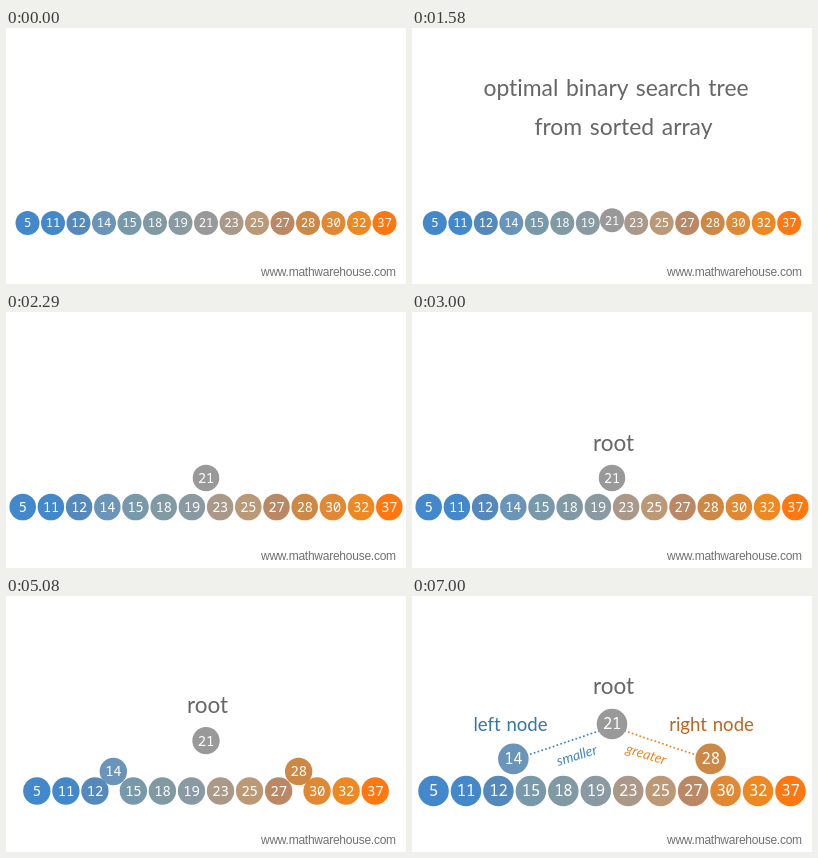
Write an HTML page that moves like this. It is 400 px wide and 256 px high and loops after 8000 ms.

```html
<!DOCTYPE html>
<html lang="en">
<head>
<meta charset="utf-8">
<title>Binary search tree from sorted array</title>
<style>
  html, body { margin: 0; width: 100%; height: 100%; overflow: hidden; background: #fff; }
  svg { display: block; width: 400px; height: 256px; }
  text { font-family: Lato, "Open Sans", sans-serif; font-variant-ligatures: none; text-anchor: middle; }
  .title { font-size: 22.9px; word-spacing: 1.8px; fill: #666; }
  .root { font-size: 22.5px; fill: #666; }
  .label { font-size: 18.6px; word-spacing: 1px; }
  .hint { font-size: 14px; font-style: italic; }
  .ball text { font: 12.3px "Noto Sans Mono", monospace; letter-spacing: -.2px; fill: #fff; }
  .site { font: 12px "Liberation Sans", Arial, sans-serif; letter-spacing: -.25px; text-anchor: start; fill: #707070; }
  .link { stroke-width: 2; stroke-linecap: round; stroke-dasharray: 0 4; }
</style>
</head>
<body>
<svg viewBox="0 0 400 256">
  <g id="title" class="title">
    <text x="204" y="68">optimal binary search tree</text>
    <text x="211.5" y="107">from sorted array</text>
  </g>
  <line id="linkL" class="link" x1="187" y1="135" stroke="#48b"/>
  <line id="linkR" class="link" x1="213" y1="135" stroke="#e82"/>
  <g id="labels" class="label">
    <text x="98.5" y="135" fill="#37a">left node</text>
    <text x="299.5" y="135" fill="#b62">right node</text>
  </g>
  <g id="hints" class="hint">
    <text transform="translate(165 160) rotate(-17)" y="4" fill="#48b">smaller</text>
    <text transform="translate(234 159) rotate(17)" y="4" fill="#e82">greater</text>
  </g>
  <text id="root" class="root" x="201.5">root</text>
  <g id="balls"></g>
  <text class="site" x="255" y="248">www.mathwarehouse.com</text>
</svg>
<script>
const LOOP = 8000, MID = 200, BASE = 195;
const values = [5, 11, 12, 14, 15, 18, 19, 21, 23, 25, 27, 28, 30, 32, 37];
const colors = "#48c #48c #58b #6a94b8 #79a #8099a3 #8a9aa3 #999 #a98 #b97 #b86 #c84 #e08833 #e82 #f71".split(" ");
const $ = id => document.getElementById(id);
const clamp = v => Math.min(1, Math.max(0, v));
const mix = (a, b, p) => a + (b - a) * p;
const easeOut = (x, power = 2) => 1 - (1 - x) ** power;
const spread = x => easeOut(clamp((x - .36) / .64), 1.5);

// Stepped progress: first change at start, last one at end
function steps(t, start, end, count) {
  if (t < start) return 0;
  const n = Math.floor((t - start) * (count - 1) / (end - start) + .15) + 1;
  return Math.min(1, n / count);
}

function make(tag, attrs, parent) {
  const el = document.createElementNS("http://www.w3.org/2000/svg", tag);
  for (const key in attrs) el.setAttribute(key, attrs[key]);
  return parent.appendChild(el);
}

const balls = values.map((value, i) => {
  const g = make("g", { class: "ball" }, $("balls"));
  make("circle", { r: 12, fill: colors[i] }, g);
  make("text", { y: 4.3 }, g).textContent = value;
  return g;
});
for (const i of [3, 11, 7]) $("balls").append(balls[i]);

// Distance from the middle, in ball spacings
function slot(d, p, q) {
  if (d === 0) return 0;
  const first = d - .5 * p;
  const shift = d > 4 ? 1 : d === 4 ? .46 : 0;
  return first - shift * q;
}

function fade(el, opacity, dy) {
  el.setAttribute("opacity", opacity);
  el.setAttribute("transform", `translate(0 ${dy})`);
}

function link(el, side, p) {
  el.setAttribute("x2", MID + side * mix(13, 82.5, p));
  el.setAttribute("y2", mix(135, 158.5, p));
  el.setAttribute("visibility", p > 0 ? "visible" : "hidden");
}

function draw(t) {
  const a = steps(t, 1580, 2290, 18), b = steps(t, 4750, 5540, 20);
  const p = easeOut(a, 1.9), q = easeOut(b, 1.9);
  const unit = 25.5 + 2.7 * spread(a) + 4.25 * spread(b);
  const top = BASE - unit * (1.03 * p + 1.035 * q);

  balls.forEach((ball, i) => {
    const d = i - 7, dist = Math.abs(d);
    const x = MID + Math.sign(d) * slot(dist, p, q) * unit;
    const y = d === 0 ? top : dist === 4 ? BASE - .99 * q * unit : BASE;
    ball.setAttribute("transform", `translate(${x} ${y}) scale(${unit / 25.5})`);
  });

  const enter = easeOut(steps(t, 40, 370, 9)), leave = a * a;
  fade($("title"), enter * (1 - leave), 33 * (1 - enter) + 40 * leave);

  const named = easeOut(steps(t, 2870, 3000, 4));
  fade($("root"), named, top - 12.5 - .53 * unit + 20 * (1 - named));

  const grow = steps(t, 5580, 6080, 13);
  const drawn = clamp(grow * 13 / 9);
  link($("linkL"), -1, drawn);
  link($("linkR"), 1, drawn);
  const shown = easeOut(clamp((grow * 13 - 9) / 4));
  fade($("labels"), shown, 20 * (1 - shown));

  $("hints").setAttribute("opacity", easeOut(steps(t, 6870, 7000, 4)));
}

let start;
function tick(now) {
  start ??= now;
  draw((now - start) % LOOP);
  requestAnimationFrame(tick);
}
draw(0);
requestAnimationFrame(tick);
</script>
</body>
</html>
```
